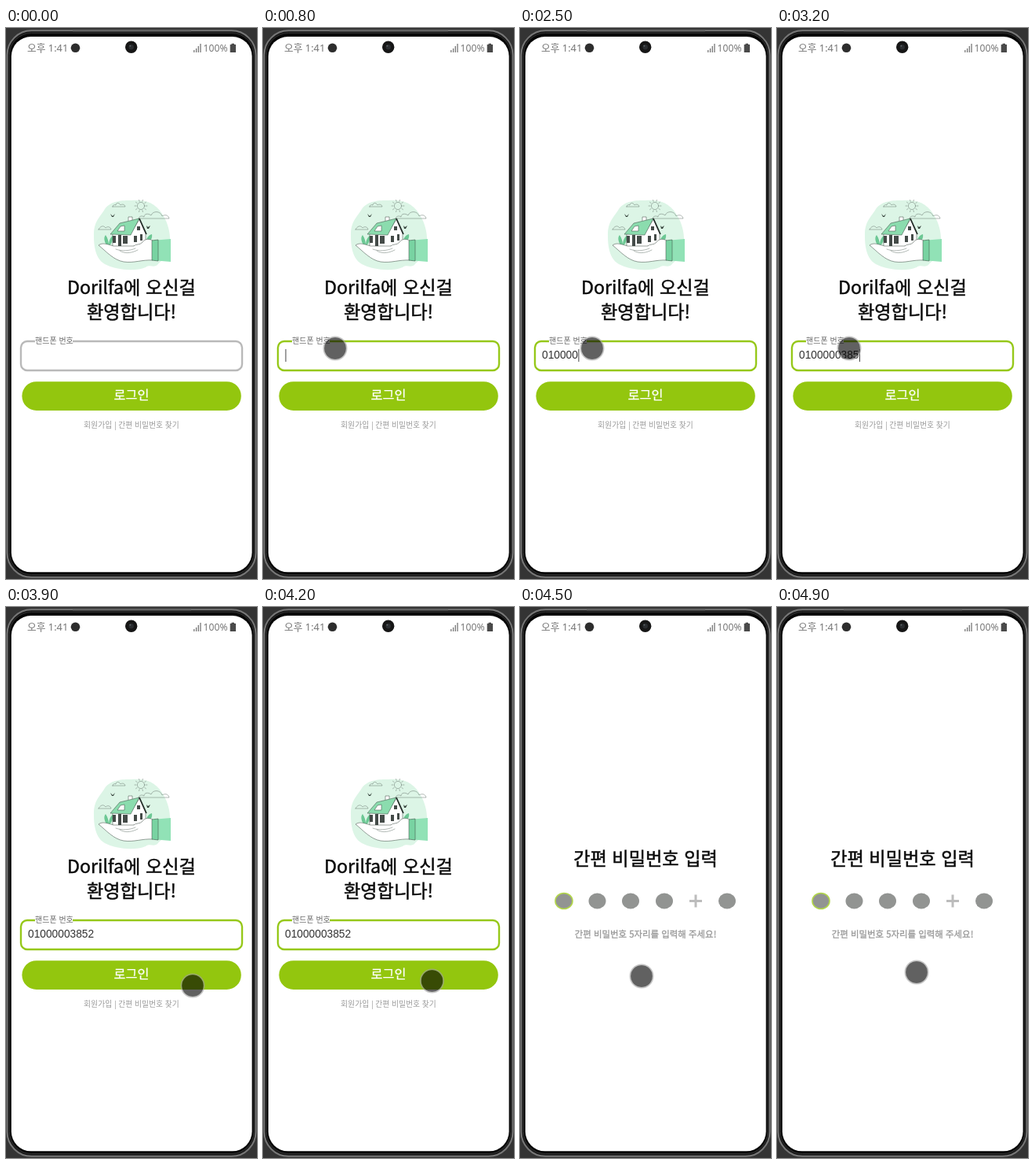
These frames come from a looping animation (320x700 px, 5000 ms). An HTML page:

```html
<!DOCTYPE html>
<html lang="ko">
<head>
<meta charset="utf-8">
<title>Login</title>
<style>
html, body { margin: 0; width: 100%; height: 100%; overflow: hidden; background: #343434; }
svg { display: block; width: 100vw; height: 100vh; }
text { font-family: "Noto Sans CJK KR", "Noto Sans CJK", "Noto Sans KR", sans-serif; white-space: pre; }
.mid { text-anchor: middle; }
.title { font-size: 23.2px; font-weight: 500; fill: #0c0c0c; stroke: #0c0c0c; stroke-width: .5px; }
.status { font-family: "Noto Sans", "Noto Sans CJK KR", sans-serif; font-weight: 300; fill: #777; }
.digits { font-family: "Liberation Sans", Arial, sans-serif; font-size: 13.75px; fill: #333; }
.ink { fill: none; stroke: #66756d; stroke-width: .5; stroke-linecap: round; stroke-linejoin: round; }
.edge { stroke: #34423b; stroke-width: .5; }
</style>
</head>
<body>
<svg viewBox="0 0 320 700" preserveAspectRatio="none">
  <!-- phone -->
  <rect width="320" height="700" fill="#343434"/>
  <rect x="1.5" y="3.3" width="317" height="694.5" rx="31" fill="#191919" stroke="#777" stroke-width="2"/>
  <rect x="4.3" y="6.5" width="311.6" height="688" rx="28" fill="#060606" stroke="#303030"/>
  <path d="M85 4.3H236" stroke="#484848" stroke-width="1.6"/>
  <rect x="6.8" y="11" width="306.8" height="680.3" rx="25" fill="#fff"/>

  <!-- status bar -->
  <text class="status" x="27" y="30" font-size="12.8">오후 1:41</text>
  <circle cx="88.5" cy="25.3" r="5.8" fill="#2d2d2d"/>
  <circle cx="159.7" cy="24.3" r="7.7" fill="#161616"/>
  <circle cx="159.7" cy="24.3" r="3.2" fill="#2a2d30"/>
  <circle cx="158.4" cy="22.8" r="1" fill="#5c6266"/>
  <path d="M239.8 28V31M242.6 26V31M245.3 23V31M248 20V31" stroke="#777" stroke-width="1.3"/>
  <text class="status" x="251.5" y="30" font-size="12.2">100%</text>
  <path d="M287.5 21V19.8H291V21H293V31H285.7V21Z" fill="#4a4a4a"/>

  <!-- login page -->
  <g id="login">
    <path d="M112 264C111 246 121 239 126 230C134 219 148 219 160 219C178 218 190 222 199 236C208 249 211 266 208 282C206 293 196 296 193 301C188 305 184 300 178 304C164 310 139 307 126 300C114 293 112 277 112 264Z" fill="#dcf5e6"/>
    <g class="ink">
      <circle cx="172" cy="226" r="4.6"/>
      <path id="rays"/>
      <path d="M136 227H152C151 223 147 224 146 225C144 221 140 222 140 225C138 224 136 225 136 227Z"/>
      <path d="M169 242H208C207 237 202 237 199 239C197 232 187 232 185 238C181 235 176 236 176 240C173 238 170 239 169 242Z"/>
      <path d="M118 256H134C133 252 129 252 127 254C124 250 120 252 118 256"/>
    </g>
    <path d="M133 236L136 239L139 236L137 240H135ZM179 251L181 253L184 251L182 255H180Z" fill="#34423b"/>
    <path d="M129 277C124 270 125 265 127 263C130 267 131 272 131 277C131 270 133 266 136 264C137 270 134 275 131 277ZM179 274C178 267 182 263 186 262C187 267 184 272 179 274Z" fill="#6cc894"/>
    <path class="edge" d="M136 261H159L170 243L178 261V273L160 278H136Z" fill="#fff"/>
    <path class="edge" d="M156 245V240H161V244" fill="#fff"/>
    <path class="edge" d="M133 262L145 248L170 242L159 263Z" fill="#8bdcae"/>
    <path d="M170 242L179 262" stroke="#222b27" stroke-width="1.7"/>
    <path class="edge" d="M142 258L146 252L151 251V258Z" fill="#fff"/>
    <path d="M136 264H140V273H136ZM143 263H147V277H143ZM149 264H155V274H149ZM163 264H167V272H163ZM171 262H174V270H171ZM167 252H171V257H167Z" fill="#444b48"/>
    <path class="edge" d="M118 276C123 272 130 275 137 277H163C166 274 171 276 174 272C178 267 183 268 187 270V295C174 294 163 299 150 297C137 295 127 283 118 276Z" fill="#fff"/>
    <path class="ink" d="M140 281C148 284 158 283 165 280M145 283C153 288 162 285 168 282"/>
    <path d="M186 270L210 268V297L186 295Z" fill="#91e2b6"/>
    <path class="edge" d="M186 270L194 269V296L186 295Z" fill="#78d3a2"/>

    <text class="title mid" x="160" y="338">Dorilfa에 오신걸</text>
    <text class="title mid" x="160" y="369">환영합니다!</text>

    <rect id="field" x="19" y="398" width="282" height="37" rx="8" fill="#fff" stroke-width="2.4"/>
    <rect x="37" y="395" width="48" height="6" fill="#fff"/>
    <text x="37" y="401" font-size="10" fill="#666">핸드폰 번호</text>
    <text id="phone" class="digits" x="28" y="420"></text>
    <rect id="caret" y="408" width="1" height="16" fill="#444"/>

    <rect x="20.4" y="449.2" width="279.4" height="36.8" rx="18.4" fill="#93c60e"/>
    <text class="mid" x="160" y="472" font-size="16.3" font-weight="500" fill="#fff" stroke="#fff" stroke-width=".25">로그인</text>
    <text class="mid" x="160" y="508" font-size="9.8" fill="#999">회원가입 | 간편 비밀번호 찾기</text>
  </g>

  <!-- PIN page -->
  <g id="pin">
    <text class="title mid" x="160" y="328">간편 비밀번호 입력</text>
    <g id="pips" fill="#929492"></g>
    <path d="M216 373.5H232M224 365.5V381.5" stroke="#bcbcbc" stroke-width="3"/>
    <text class="mid" x="160" y="420" font-size="11.45" font-weight="500" fill="#999" stroke="#999" stroke-width=".3">간편 비밀번호 5자리를 입력해 주세요!</text>
  </g>

  <g id="pointer">
    <circle r="14" fill="#000" fill-opacity=".62"/>
    <circle r="14.6" fill="none" stroke="#a0a0a0" stroke-opacity=".6" stroke-width="1.8"/>
  </g>
</svg>
<script>
const LOOP = 5000, STEP = 100;
const FOCUS = 700, BLUR = 4400, NEXT_PAGE = 4500;
const NUMBER = "01000003852", DIGIT = 7.645;
const KEYS = [1500, 1700, 1800, 1900, 2200, 2400, 2600, 2800, 3000, 3200, 3400];
// time, x, y
const PATH = [
  [100, 285, 469], [300, 196, 440], [600, 92, 407],
  [3500, 92, 407], [3600, 110, 416], [3800, 210, 468], [3900, 238, 481],
  [4000, 253, 480], [4100, 253, 479], [4300, 178, 471], [4400, 155, 469],
  [4700, 155, 469], [4900, 178, 464]
];
const $ = id => document.getElementById(id);
const show = (id, on) => $(id).setAttribute("visibility", on ? "visible" : "hidden");

$("rays").setAttribute("d", Array.from({ length: 10 }, (_, i) => {
  const a = i * Math.PI / 5, c = Math.cos(a), s = Math.sin(a);
  return `M${172 + 6 * c} ${226 + 6 * s}L${172 + 8 * c} ${226 + 8 * s}`;
}).join(""));

$("pips").innerHTML = [56, 98.5, 141, 184, 264].map((x, i) =>
  `<ellipse cx="${x}" cy="373.5" rx="11" ry="10"${i ? "" : ' stroke="#b2d64a" stroke-width="1.6"'}/>`
).join("");

function pointerAt(t) {
  const i = PATH.findIndex(p => p[0] >= t);
  if (i < 0) return PATH[PATH.length - 1].slice(1);
  if (i === 0) return PATH[0].slice(1);
  const [t0, x0, y0] = PATH[i - 1], [t1, x1, y1] = PATH[i];
  const k = (t - t0) / (t1 - t0);
  return [x0 + (x1 - x0) * k, y0 + (y1 - y0) * k];
}

function render(t) {
  const login = t < NEXT_PAGE;
  const focused = t >= FOCUS && t < BLUR;
  const typed = KEYS.filter(k => k <= t).length;
  const lastInput = typed ? KEYS[typed - 1] : FOCUS;
  const caretOn = focused && Math.floor((t - lastInput) / 500) % 2 === 0;

  $("login").style.display = login ? "" : "none";
  $("pin").style.display = login ? "none" : "";
  $("field").setAttribute("stroke", focused ? "#96c81a" : "#b9b9b9");
  $("phone").textContent = NUMBER.slice(0, typed);
  $("caret").setAttribute("x", 28.5 + DIGIT * typed);
  show("caret", login && caretOn);
  show("pointer", t >= 100);
  $("pointer").setAttribute("transform", `translate(${pointerAt(t)})`);
}

const start = performance.now();
function tick() {
  const t = (performance.now() - start) % LOOP;
  render(Math.floor(t / STEP) * STEP);
  requestAnimationFrame(tick);
}
tick();
</script>
</body>
</html>
```
